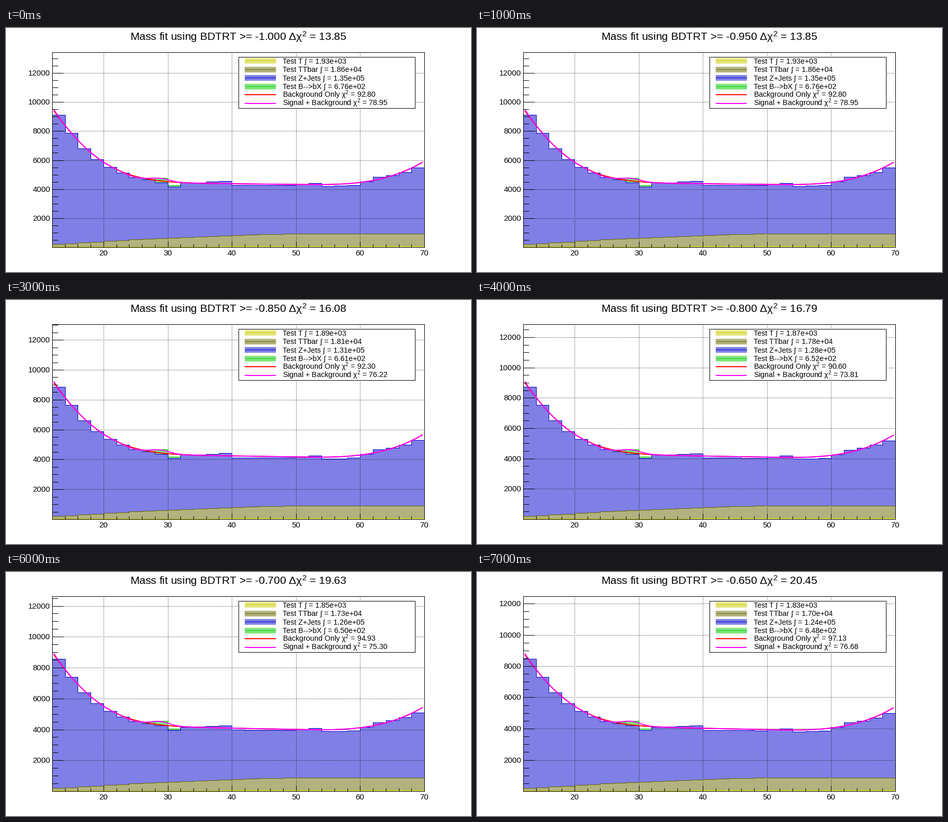
A matplotlib script that plays this animation: 896x472 px, repeating every 8000 ms.

```python
import numpy as np
import matplotlib.pyplot as plt
from matplotlib.animation import FuncAnimation

plt.rcParams["mathtext.fontset"] = "custom"
plt.rcParams["mathtext.rm"] = "Liberation Sans"
plt.rcParams["mathtext.default"] = "regular"

W, H, DPI = 896, 472, 100
LEFT, RIGHT, TOP, BOTTOM = 89, 806, 47, 424
BINS = np.arange(29)
EDGES = np.round(np.linspace(LEFT, RIGHT, len(BINS) + 1))
CENTERS = (EDGES[:-1] + EDGES[1:]) / 2

T_COLOR, TT_COLOR, Z_COLOR, B_COLOR = np.array(
    [(0.8, 0.8, 0), (0.4, 0.4, 0), (0, 0, 0.8), (0, 0.8, 0)])
RED, MAGENTA = "#ff0000", "#ff00ff"

# Per cut: pixels per 1000 events, chi2 of both fits, signal integral
RUNS = [
    (28.08, 92.80, 78.95, 676),
    (28.50, 94.01, 78.63, 670),
    (28.90, 92.30, 76.22, 661),
    (29.33, 90.60, 73.81, 652),
    (29.65, 92.36, 74.55, 652),
    (29.87, 94.93, 75.30, 650),
    (30.25, 97.13, 76.68, 648),
]

# Main deviations of the bars from the fit: (bin, pixels)
WIGGLE = np.array([(0, -4), (2, 4), (5, 1), (8, -1), (9, 7), (10, 0), (13, -5),
                   (14, 3), (18, 2), (20, -3), (21, 3), (23, 4), (25, -4), (28, 5)])

YY, XX = np.mgrid[0:H, 0:W]
COLUMN = np.clip(np.searchsorted(EDGES, XX[0], side="right") - 1, 0, BINS[-1])

fig = plt.figure(figsize=(W / DPI, H / DPI), dpi=DPI, facecolor="white")
ax = fig.add_axes([0, 0, 1, 1])


def gauss(x, mid, sigma):
    return np.exp(-0.5 * ((x - mid) / sigma) ** 2)


def background(x, tight):
    u = x - 92
    fall = 141 * np.exp(-0.0098 * u - 3.05e-5 * u ** 2)
    rise = 43.5 * np.clip((x - 580) / 223, 0, None) ** 3
    sag = np.clip((x - 400) / 100, 0, 2) + 3 * tight * np.clip((x - 330) / 300, 0, 1)
    return 301 - fall - rise + sag


def with_signal(x, tight):
    return (background(x, tight) - (5 + 2 * tight) * gauss(x, 298, 17)
            + 2 * gauss(x, 245, 15) - 2.5 * np.exp((92 - x) / 15))


def line(xs, ys, color="black", width=1, z=5):
    ax.plot(xs, ys, color=color, lw=width * 72 / DPI, zorder=z,
            solid_capstyle="butt")


def label(x, y, text, size, ha="left"):
    ax.text(x, y, text, fontsize=size * 72 / DPI, ha=ha, va="baseline",
            family="Liberation Sans", zorder=8)


def ticks(scale):
    """Yield (pixel, value, is_major) lists for the x and y axes."""
    xs = [(round(LEFT + (v - 12) * (RIGHT - LEFT) / 58), v, v % 10 == 0)
          for v in range(12, 71, 2)]
    ys = [(round(BOTTOM - v * scale / 1000), v, v % 2000 == 0)
          for v in range(500, int((BOTTOM - TOP) / scale * 1000), 500)]
    return xs, ys


def outline(tops, color, z):
    xs = np.repeat(EDGES, 2)
    ys = np.concatenate([[BOTTOM], np.repeat(tops, 2), [BOTTOM]])
    line(xs, ys, color, z=z)


def paint(layers, xs, ys):
    rgb = np.ones((H, W, 3))
    inside = (XX > LEFT) & (XX < RIGHT) & (YY < BOTTOM)
    for tops, color in layers:
        rgb[inside & (YY >= tops[COLUMN])] = (1 + color) / 2
    for x, _, major in xs:
        if major:
            rgb[TOP:BOTTOM:3, x] = 0
    for y, _, major in ys:
        if major:
            rgb[y, LEFT:RIGHT:3] = 0
    rgb[56:156, 448:789] = 1
    for row, color in enumerate((T_COLOR, TT_COLOR, Z_COLOR, B_COLOR)):
        y = int(58.5 + 16.5 * row)
        rgb[y:y + 11, 460:520] = (1 + color) / 2
    ax.imshow(rgb, extent=(0, W, H, 0), interpolation="nearest",
              aspect="auto", zorder=1)


def draw_axes(xs, ys):
    for x, value, major in xs:
        line([x, x], [BOTTOM, BOTTOM - (11 if major else 6)])
        if major:
            label(x, 440, str(value), 15, "center")
    for y, value, major in ys:
        line([LEFT, LEFT + (22 if major else 11)], [y, y])
        if major:
            label(85, y + 5.2, str(value), 15, "right")
    line([LEFT, RIGHT, RIGHT, LEFT, LEFT], [TOP, TOP, BOTTOM, BOTTOM, TOP], z=6)


def draw_legend(chi_b, chi_s, counts):
    line([448, 788, 788, 448, 448], [56, 56, 155, 155, 56], z=6)
    names = ("Test T", "Test TTbar", "Test Z+Jets", "Test B-->bX")
    texts = [f"{n} ∫ = {c:.2e}" for n, c in zip(names, counts)]
    texts += [f"Background Only χ$^2$ = {chi_b:.2f}",
              f"Signal + Background χ$^2$ = {chi_s:.2f}"]
    colors = (T_COLOR, TT_COLOR, Z_COLOR, B_COLOR, RED, MAGENTA)
    for row, (text, color) in enumerate(zip(texts, colors)):
        y = 63.5 + 16.5 * row
        label(533, y + 4.3, text, 14.2)
        line([460, 520], [int(y)] * 2, color, 1 if row < 4 else 2, z=7)


def draw(i):
    step = max(i - 1, 0)  # the first two cuts select the same events
    scale, chi_b, chi_s, signal = RUNS[step]
    tight = (scale - RUNS[0][0]) / (RUNS[-1][0] - RUNS[0][0])
    counts = (1930 - 100 * tight, 18600 - 260 * step, 134800 - 11000 * tight, signal)

    total = np.round(with_signal(CENTERS, tight) + np.interp(BINS, *WIGGLE.T))
    z_tops = total + np.round(9 * gauss(BINS, 8, 0.7))
    tt_tops = BOTTOM - np.round(6 + 20.5 * np.sin(np.minimum(BINS / 22, 1) * np.pi / 2))
    t_tops = BOTTOM - np.where(BINS < 13, 1, 2)
    layers = [(total, B_COLOR), (z_tops, Z_COLOR), (tt_tops, TT_COLOR), (t_tops, T_COLOR)]

    ax.clear()
    ax.axis("off")
    xs, ys = ticks(scale)
    paint(layers, xs, ys)
    for z, (tops, color) in enumerate(layers):
        outline(tops, color, 3 + z / 10)
    x = np.linspace(92, 803, 300)
    line(x, background(x, tight), RED, 2, z=4)
    line(x, with_signal(x, tight), MAGENTA, 2, z=4.5)
    draw_axes(xs, ys)
    draw_legend(chi_b, chi_s, counts)
    label(447.5, 23.3, f"Mass fit using BDTRT >= {-1 + 0.05 * i:.3f} "
          f"Δχ$^2$ = {chi_b - chi_s:.2f}", 21, "center")
    ax.set_xlim(0, W)
    ax.set_ylim(H, 0)
    return ax.get_children()


anim = FuncAnimation(fig, draw, frames=len(RUNS) + 1, interval=1000,
                     repeat=True, repeat_delay=0, blit=False)
plt.show()
```
